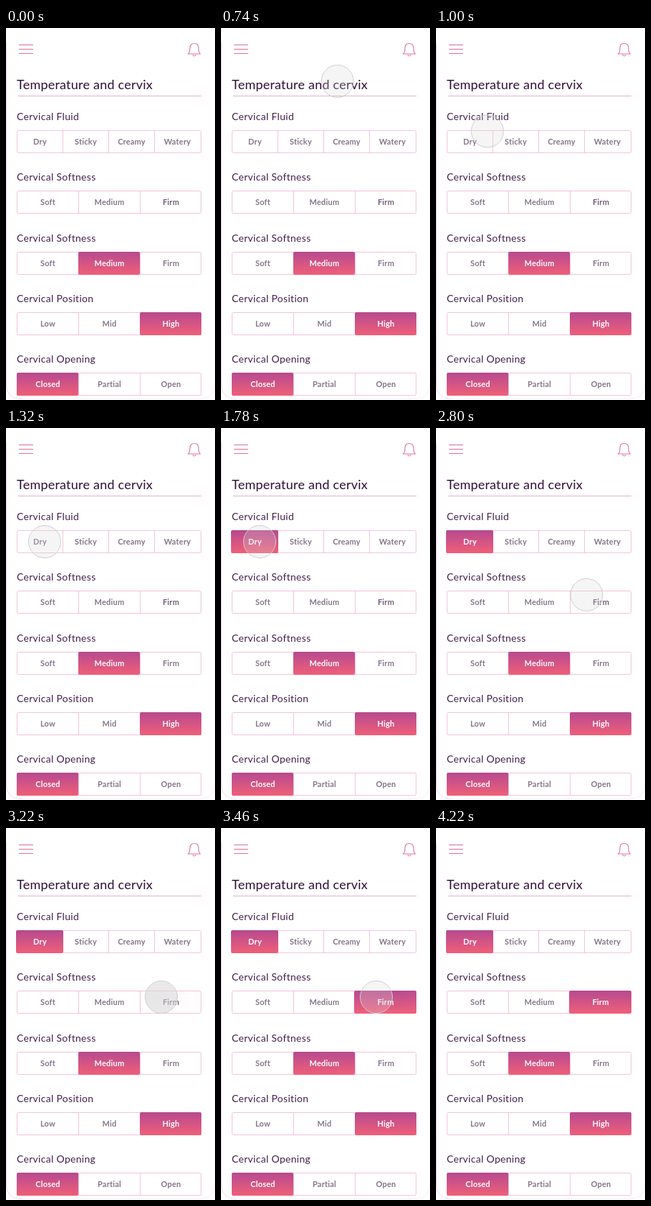
An HTML page for the animation above (6.4 s loop, 292 by 517 pixels).

```html
<!DOCTYPE html>
<html lang="en">
<head>
<meta charset="utf-8">
<title>Daily log</title>
<style>
  html, body { margin: 0; width: 100%; height: 100%; overflow: hidden; background: #fff; }
  svg { display: block; width: 100%; height: 100%; font-family: Lato, "Open Sans", sans-serif; }
  .title { font-size: 18px; letter-spacing: .22px; fill: #2f0f39; }
  .label { font-size: 14px; letter-spacing: .3px; fill: #42204d; }
  .option { font-size: 11px; font-weight: 700; letter-spacing: .2px; fill: #85758a; text-anchor: middle; }
  .strong { fill: #725c77; }
  .on { fill: #fff; }
  .icon { fill: none; stroke: url(#ink); stroke-width: 1.1; stroke-linecap: round; stroke-linejoin: round; }
  .frame { fill: none; stroke: #f1c3dc; }
</style>
</head>
<body>
<svg id="stage" viewBox="0 0 292 517">
  <defs>
    <linearGradient id="fill" x2="0" y2="1">
      <stop stop-color="#b64a90"/><stop offset="1" stop-color="#f05f78"/>
    </linearGradient>
    <linearGradient id="ink" gradientUnits="userSpaceOnUse" x1="0" y1="18" x2="0" y2="41">
      <stop stop-color="#cc6ca4"/><stop offset="1" stop-color="#ea7490"/>
    </linearGradient>
  </defs>
  <path d="M.5 20V494Q.5 515.5 22 515.5" fill="none" stroke="#f1d9f1"/>
  <path d="M22 515.5H270Q291.5 515.5 291.5 494" fill="none" stroke="#f5eff5"/>
  <path class="icon" d="M18.5 23.500H37.5M18.5 29.500H37.5M18.5 35.500H37.5"/>
  <path class="icon" d="M254.500 36C257 34 257 31.500 257 28C257 23.500 259.500 21.500 263 21.500S269 23.500 269 28C269 31.500 269 34 271.500 36ZM261 37.500Q263 40.500 265 37.500"/>
  <text class="title" x="15" y="84.500">Temperature and cervix</text>
  <path d="M17 94.500H273" stroke="#e3b0d3"/>
  <g id="rows"></g>
  <circle id="touch" r="22.500" fill="#d8d8d8" stroke="#cecece"/>
</svg>
<script>
const LOOP = 6400, MOVE = 680, FADE = 280;
const LEFT = 15.5, RIGHT = 272.5;
const rows = document.getElementById('rows');
const touch = document.getElementById('touch');

function add(tag, attrs, parent = rows, text = '') {
  const node = document.createElementNS('http://www.w3.org/2000/svg', tag);
  for (const key in attrs) node.setAttribute(key, attrs[key]);
  node.textContent = text;
  return parent.appendChild(node);
}

function selected(x, y, width, cx, text) {
  const group = add('g', {});
  add('rect', { x, y, width, height: 32, rx: 2, fill: 'url(#fill)' }, group);
  add('text', { class: 'option on', x: cx, y: y + 20 }, group, text);
  return group;
}

function row(label, y, options, active = -1) {
  const step = Math.round((RIGHT - LEFT) / options.length);
  const center = i => LEFT + (i + .5) * step;
  add('text', { class: 'label', x: 15, y: y - 14 }, rows, label);
  add('rect', { class: 'frame', x: LEFT, y: y + .5, width: RIGHT - LEFT, height: 31, rx: 2 });
  options.forEach((text, i) => {
    if (i) add('path', { class: 'frame', d: `M${LEFT + i * step} ${y}v32` });
    if (i !== active) add('text', { class: 'option', x: center(i), y: y + 20 }, rows, text);
  });
  if (active >= 0) selected(LEFT - .5 + active * step, y, step, center(active), options[active]);
}

const levels = ['Soft', 'Medium', 'Firm'];
row('Cervical Fluid', 142, ['Dry', 'Sticky', 'Creamy', 'Watery']);
row('Cervical Softness', 226, levels);
rows.lastChild.classList.add('strong');
row('Cervical Softness', 311, levels, 1);
row('Cervical Position', 395, ['Low', 'Mid', 'High'], 2);
row('Cervical Opening', 479, ['Closed', 'Partial', 'Open'], 0);

const dry = selected(14, 142, 66, 47.5, 'Dry');
const firm = selected(186, 226, 87, 230, 'Firm');

const progress = (t, start, length) => Math.min(1, Math.max(0, (t - start) / length));
const easeOut = u => 1 - (1 - u) ** 2.4;
const smooth = u => u * u * (3 - 2 * u);
const mix = (a, b, p) => a.map((v, i) => v + (b[i] - v) * p);

function touchPoint(t) {
  if (t < 1160) {
    const p = easeOut(progress(t, 500, MOVE)), bend = [218, 9.5];
    return mix(mix([315, 34], bend, p), mix(bend, [59, 155], p), p);
  }
  if (t < 2300) return mix([59, 155], [54, 158], easeOut(progress(t, 1160, 160)));
  if (t < 4140) return mix([54, 158], [217, 235], easeOut(progress(t, 2300, MOVE)));
  return mix([217, 235], [472, -55], easeOut(progress(t, 4140, MOVE)));
}

function draw() {
  const t = performance.now() % LOOP;
  const dryOn = smooth(progress(t, 1500, FADE));
  const firmOn = smooth(progress(t, 3205, FADE - 5));
  dry.setAttribute('opacity', dryOn);
  firm.setAttribute('opacity', firmOn);

  // The touch darkens on each tap and clears as the option fills.
  const press = (t >= 1520 ? 1 - dryOn : 0) + (t >= 3220 ? 1 - firmOn : 0);
  const [x, y] = touchPoint(t);
  touch.setAttribute('cx', x);
  touch.setAttribute('cy', y);
  touch.setAttribute('fill-opacity', .25 + .3 * press);
  touch.setAttribute('visibility', t >= 520 && t < 4220 ? 'visible' : 'hidden');
  requestAnimationFrame(draw);
}
draw();
</script>
</body>
</html>
```
